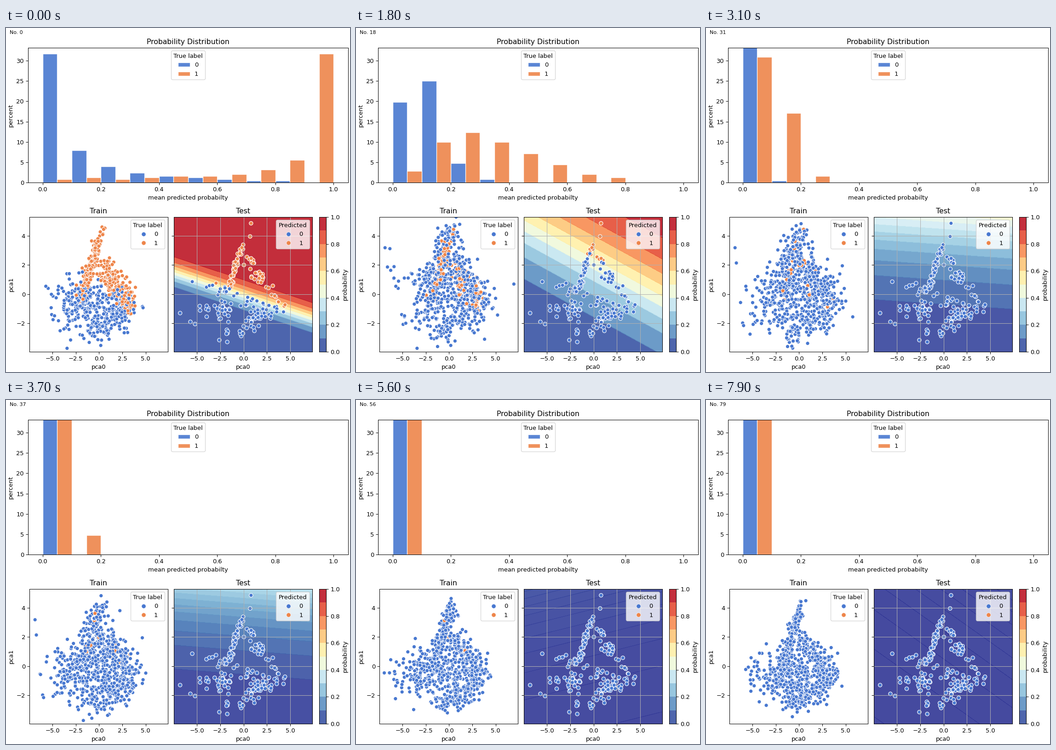
Recreate the animation shown at these times as a matplotlib script. Size 748 by 748 pixels, loop 8 s.

```python
import numpy as np
import matplotlib.pyplot as plt
from matplotlib.animation import FuncAnimation
from matplotlib.lines import Line2D
from matplotlib.patches import Patch

SIZE, DPI, FRAMES = 748, 93.5, 80
COLORS = np.array(["#4878D0", "#EE854A"])
XLIM, YLIM = (-7.47, 7.36), (-3.95, 5.28)

plt.rcParams["font.family"] = "DejaVu Sans"
rng = np.random.default_rng(7)


def blob(n, x, y, sx, sy):
    return rng.normal((x, y), (sx, sy), (n, 2))


def strip(t, start, end, sx, sy):
    """Points scattered around a line, at the fractions t."""
    t = np.asarray(t)[:, None]
    line = np.array(start) * (1 - t) + np.array(end) * t
    return line + rng.normal(0, (sx, sy), line.shape)


# Training data: two arms of positives above a wide bowl of negatives
def positives(n):
    left = n // 2
    return np.vstack([
        strip(rng.beta(1.6, 1.7, left), (0.4, 4.5), (-2.1, -0.6), 0.24, 0.2),
        strip(rng.random(n - left), (0.2, 2.0), (3.4, -0.7), 0.5, 0.42)])


def negatives(n):
    left, low = int(n * 0.36), int(n * 0.42)
    return np.vstack([
        blob(left, -2.6, -0.6, 1.5, 0.85),
        strip(rng.random(low), (-1.2, -2.6), (3.4, -1.0), 0.55, 0.45),
        blob(n - left - low, 0.2, -0.4, 1.8, 0.6)])


def newcomers(n, step):
    """Negative samples whose distribution drifts with the step."""
    k = int(n * np.interp(step, [0, 18, 31], [0.65, 0.6, 0.45]))
    pts = np.vstack([positives(k), negatives(n - k)])
    lift = np.interp(step, [0, 18, 28], [1, 1, 0])
    noise = np.interp(step, [0, 18, 30, 38, 50], [0.5, 0.5, 0.7, 0.25, 0.06])
    x, y = pts.T
    pts[:, 1] += lift * (y > -1.2) * (0.35 + 0.35 * np.maximum(-x - 1.5, 0))
    return pts + rng.normal(0, (1.3 * noise, 0.8 * noise), pts.shape)


def train_history(n_pos=370, n_neg=430):
    n = n_pos + n_neg
    order = rng.permutation(n)
    pts = np.vstack([positives(n_pos), negatives(n_neg)])[order]
    label = np.repeat([1, 0], [n_pos, n_neg])[order]
    history = [(pts, label)]
    for step in range(1, FRAMES):
        pts, label = pts.copy(), label.copy()
        renew = np.interp(step, [0, 18, 31], [0.05, 0.08, 0.1])
        slots = rng.choice(n, int(n * renew), replace=False)
        pts[slots] = newcomers(len(slots), step)
        label[slots] = 0
        history.append((pts, label))
    return history


def test_samples():
    outliers = [(0.8, 4.85), (0.7, 3.95), (-6.8, -1.3), (-5.5, 0.85),
                (-5.7, -1.9), (-5.2, -2.05), (-2.6, -3.15), (-1.75, -3.28)]
    t = rng.random(54)
    arm = np.column_stack([-0.05 - 1.45 * t ** 0.75, 3.3 - 2.9 * t])
    return np.vstack([
        outliers,
        arm + rng.normal(0, 0.12, arm.shape),
        strip(rng.random(28), (0.3, 2.4), (2.0, 0.8), 0.35, 0.25),
        strip(rng.random(14), (2.5, 0.7), (4.0, -1.1), 0.35, 0.3),
        strip(rng.random(46), (0.2, -1.9), (3.0, -1.2), 0.4, 0.28),
        strip(rng.random(14), (-4.0, 0.6), (-1.3, 0.1), 0.35, 0.15),
        blob(24, -2.0, -1.2, 0.55, 0.45),
        blob(7, -3.9, -1.0, 0.4, 0.3),
        blob(12, 1.0, -0.6, 1.0, 0.25),
        blob(5, -0.2, -2.6, 0.2, 0.2),
        blob(4, -1.6, -2.6, 0.2, 0.2)])


def logit(step, x, y):
    """Linear decision function; it flattens and sinks as steps pass."""
    keys = [0, 9, 18, 31, 44, 56, 79]
    bias = np.interp(step, keys, [0.11, -1, -1.34, -2.63, -3.92, -4.86, -5.88])
    wx = np.interp(step, keys, [0.454, 0.429, 0.192, 0.02, 0.025, -0.035, 0.068])
    wy = np.interp(step, keys, [2.15, 1.424, 0.547, 0.45, 0.438, 0.22, 0.15])
    return bias + wx * x + wy * y


def sigmoid(z):
    return 1 / (1 + np.exp(-z))


def bin_percents(n, mean, spread):
    """Ten-bin histogram of n evenly ranked logit-normal probabilities."""
    u = (np.arange(n) + 0.5) / n
    normal = 4.91 * (u ** 0.14 - (1 - u) ** 0.14)
    counts, _ = np.histogram(sigmoid(mean + spread * normal), 10, (0, 1))
    return counts * 100 / 252


def percents(step):
    keys = [0, 9, 18, 31, 44]
    neg = bin_percents(127,
                       np.interp(step, keys, [-2.77, -2.9, -2.05, -3.2, -4.3]),
                       np.interp(step, keys, [1.73, 1.45, 0.54, 0.42, 0.4]))
    pos = bin_percents(125, -4.6 + 7.7 * np.exp(-step / 25),
                       0.42 + 2.11 * np.exp(-step / 11))
    return neg, pos


def add_axes(left, top, right, bottom):
    return fig.add_axes([left / SIZE, 1 - bottom / SIZE,
                         (right - left) / SIZE, (bottom - top) / SIZE])


def dot_legend(ax, title):
    dots = [Line2D([], [], ls="", marker="o", ms=7.2, mfc=c, mec="w", mew=0.5)
            for c in COLORS]
    ax.legend(dots, ["0", "1"], title=title, loc="upper right")


train = train_history()
test = test_samples()
wobble = rng.normal(0, 0.25, len(test))
gx, gy = np.meshgrid(np.linspace(*XLIM, 100), np.linspace(*YLIM, 100))

fig = plt.figure(figsize=(SIZE / DPI, SIZE / DPI), dpi=DPI, facecolor="w")
counter = fig.text(7.5 / SIZE, 1 - 13 / SIZE, "No. 0", fontsize="small")

# Histogram
hist_ax = add_axes(48, 43, 744, 336)
hist_ax.set(title="Probability Distribution", ylabel="percent",
            xlabel="mean predicted probabilty",
            xlim=(-0.05, 1.05), ylim=(0, 33.17))
starts = np.arange(10) / 10
bars = [hist_ax.bar(starts + 0.05 * k, np.zeros(10), 0.05, align="edge",
                    color=c, alpha=0.9, edgecolor="w", linewidth=1)
        for k, c in enumerate(COLORS)]
hist_ax.legend([Patch(fc=c, ec="w", alpha=0.9) for c in COLORS], ["0", "1"],
               title="True label", loc="upper center")

# Scatter plots
train_ax = add_axes(51, 411, 351.6, 704)
test_ax = add_axes(365, 411, 666, 704)
for ax, name in ((train_ax, "Train"), (test_ax, "Test")):
    ax.set(title=name, xlabel="pca0", xlim=XLIM, ylim=YLIM,
           xticks=[-5, -2.5, 0, 2.5, 5], yticks=[-2, 0, 2, 4])
train_ax.set_ylabel("pca1")
test_ax.tick_params(labelleft=False)
test_ax.grid(True)
dot_legend(train_ax, "True label")
dot_legend(test_ax, "Predicted")
train_dots = train_ax.scatter(*train[0][0].T, s=40, edgecolor="w", lw=0.75)
test_dots = test_ax.scatter(*test.T, s=40, edgecolor="w", lw=0.9)

# Colour scale
bar_ax = add_axes(681, 411, 696, 704)
bar_ax.imshow((np.arange(10)[:, None] + 0.5) / 10, cmap="RdYlBu_r", vmin=0,
              vmax=1, alpha=0.9, origin="lower", aspect="auto",
              extent=(0, 1, 0, 1), interpolation="nearest")
bar_ax.yaxis.tick_right()
bar_ax.yaxis.set_label_position("right")
bar_ax.set(xticks=[], yticks=np.linspace(0, 1, 6), ylabel="probability")

surface = None


def update(step):
    global surface
    counter.set_text(f"No. {step}")

    for group, heights in zip(bars, percents(step)):
        for bar, height in zip(group, heights):
            bar.set_height(height)
            bar.set_visible(height > 0)

    pts, label = train[step]
    train_dots.set_offsets(pts)
    train_dots.set_facecolor(COLORS[label])

    predicted = logit(step, *test.T) + wobble > 0
    test_dots.set_facecolor(COLORS[predicted.astype(int)])

    if surface is not None:
        surface.remove()
    surface = test_ax.contourf(gx, gy, sigmoid(logit(step, gx, gy)), levels=10,
                               cmap="RdYlBu_r", vmin=0, vmax=1, alpha=0.9,
                               zorder=0)
    return []


anim = FuncAnimation(fig, update, frames=FRAMES, interval=100, repeat=True,
                     repeat_delay=0)
plt.show()
```
